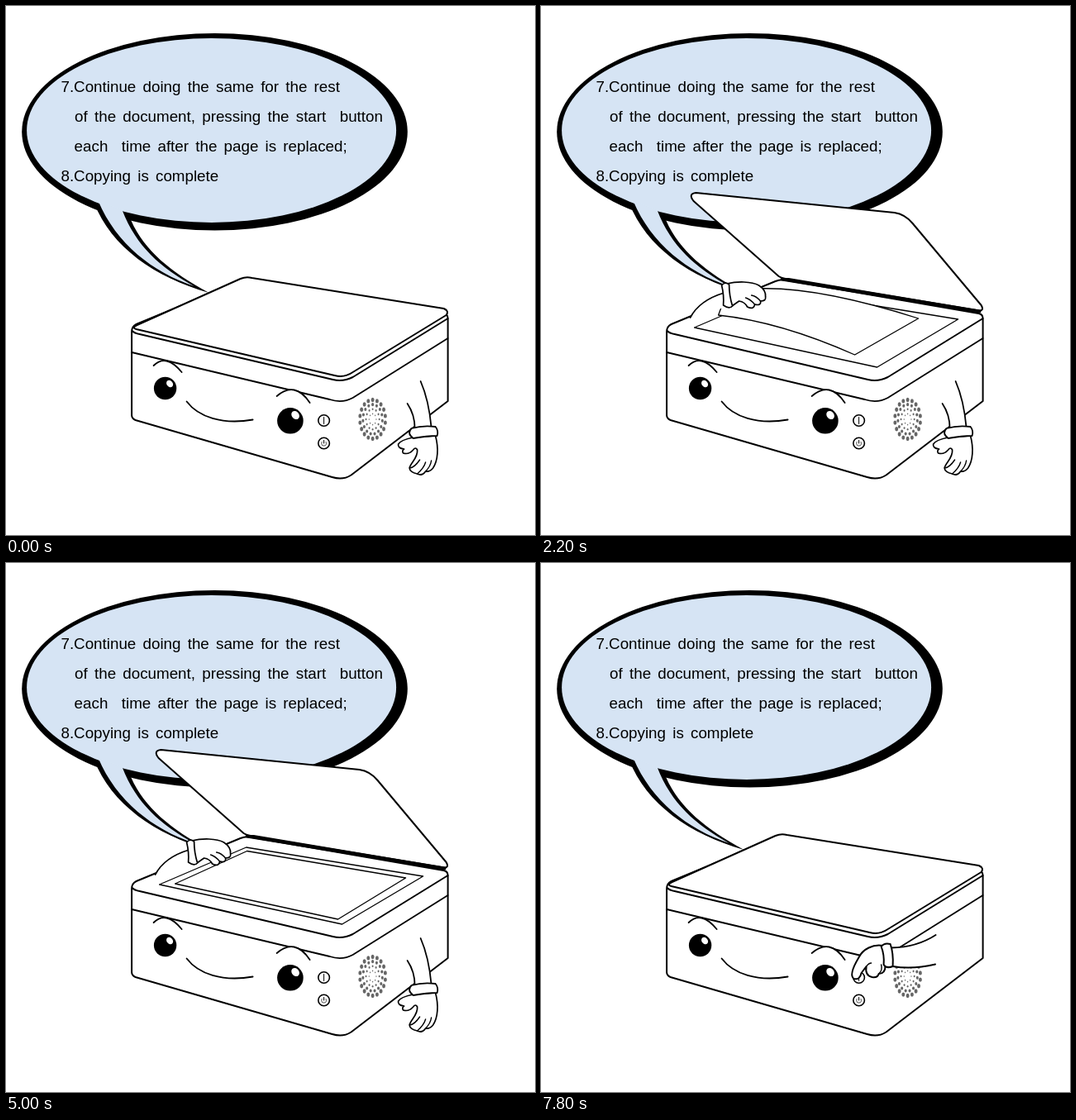
An HTML page with a canvas that plays this animation: 640 by 640 pixels, repeating every 8 s.

```html
<!DOCTYPE html>
<html lang="en">
<head>
<meta charset="utf-8">
<title>Copying a document</title>
<style>
html, body { margin: 0; width: 100%; height: 100%; overflow: hidden; background: #fff; }
canvas { display: block; width: 640px; height: 640px; }
</style>
</head>
<body>
<canvas id="stage" width="640" height="640"></canvas>
<script>
const ctx = document.getElementById('stage').getContext('2d');
const LOOP = 8000;
const CLOSED = 0, AJAR = 1, HALF = 2, OPEN = 3;

// Poses are held until the next start time.
const poses = [
  { at: 0, lid: CLOSED },
  { at: 1000, lid: AJAR, page: true },
  { at: 1400, lid: HALF, page: true, hand: 'wave' },
  { at: 1800, lid: OPEN, page: true, hand: 'wave' },
  { at: 2200, lid: OPEN, hand: 'pull' },
  { at: 2600, lid: OPEN, hand: 'hold' },
  { at: 3000, lid: OPEN, hand: 'tuck' },
  { at: 3400, lid: OPEN },
  { at: 3800, lid: OPEN, hand: 'tuck', lit: true },
  { at: 4200, lid: OPEN, hand: 'hold', lit: true },
  { at: 4600, lid: OPEN },
  { at: 5000, lid: OPEN, page: true, hand: 'lay' },
  { at: 5400, lid: OPEN, page: true },
  { at: 5800, lid: OPEN, page: true, hand: 'wave' },
  { at: 6200, lid: HALF, page: true, hand: 'wave', tucked: true },
  { at: 6600, lid: AJAR, page: true },
  { at: 7000, lid: CLOSED },
  { at: 7800, lid: CLOSED, press: true }
];

function fill(d, color = '#fff') {
  ctx.fillStyle = color;
  ctx.fill(new Path2D(d));
}
function line(d, width = 2) {
  ctx.lineWidth = width;
  ctx.strokeStyle = '#000';
  ctx.stroke(new Path2D(d));
}
function shape(d, width, color) {
  fill(d, color);
  line(d, width);
}
function oval(x, y, rx, ry, color, turn = 0) {
  ctx.beginPath();
  ctx.ellipse(x, y, rx, ry, turn, 0, Math.PI * 2);
  ctx.fillStyle = color;
  ctx.fill();
}
function ring(x, y, r, width) {
  ctx.beginPath();
  ctx.arc(x, y, r, 0, Math.PI * 2);
  ctx.lineWidth = width;
  ctx.strokeStyle = '#000';
  ctx.stroke();
}

function bubble() {
  const blue = '#d6e4f4';
  oval(252.9, 152.3, 233.3, 119.3, '#000');
  fill('M107 238C128 292 180 328 246 347C200 322 168 296 152 260L140 246Z', '#000');
  oval(249, 150.5, 223.5, 111.5, blue);
  fill('M112 236C134 288 178 322 228 339C188 317 158 291 141 247Z', blue);
  ctx.fillStyle = '#000';
  ctx.font = '18.8px "Liberation Sans", Arial, sans-serif';
  ctx.wordSpacing = '3px';
  ctx.fillText('7.', 67, 103.5);
  ctx.fillText('Continue doing the same for the rest', 82.5, 103.5);
  ctx.fillText('of the document, pressing the start  button', 83.5, 139.5);
  ctx.fillText('each  time after the page is replaced;', 83, 176);
  ctx.fillText('8.', 67, 212);
  ctx.fillText('Copying is complete', 82.5, 212);
}

function openLid() {
  shape('M288 327L185 236Q178 227 188 226L428 250Q441 252 450 263L533 362Q537 369 530 368.500L300 330Q293 330 288 327Z');
}
function halfLid(tucked) {
  fill('M291 329L167 264L408 296Q422 297 432 303L533 368Z');
  line((tucked ? 'M291 329L206 286M205 269' : 'M291 329L167 264') +
    'L408 296Q422 297 432 303L533 368');
}
function ajarLid() {
  shape('M286 331L159 351Q153 347 162 344L284 330Q291 328 298 330L531 368Q535 370 530 372L422 394Q410 397 396 394L159 351');
}
function closedLid() {
  shape('M159 386L284 330Q291 327 298 329L530 366Q537 369 533 374L420 443Q410 450 398 447L158 391Q152 389 159 386Z');
}

function body() {
  shape('M152.500 395Q152 388 158 385L284 333Q291 330 298 332L530 372Q535 373 535 378V478L418 567.500Q408 574 395 570L157 501Q152.500 499 152.500 495Z');
  line('M153 393Q156 396 162 397L396 452Q408 455 420 449L535 378');
  line('M152.500 419L392 476Q407 481 420 474L535 402', 1.8);
}

function glass(page) {
  line('M291 344L505 379L407 437L186 389Z', 1.3);
  if (page) line('M292 348.500L484 381L402 431L205 388Z', 1.3);
}

function face() {
  line('M179 435Q194 420 213 443', 1.8);
  shape('M328 472Q350 453 368 480', 1.8);
  oval(193, 462.5, 13.7, 13.7, '#000');
  oval(198.5, 457, 3.6, 4.6, '#fff', -0.7);
  oval(344.3, 501.8, 15.8, 15.8, '#000');
  oval(350.5, 495, 4.4, 5.4, '#fff', -0.7);
  line('M219 478.500C233 497 262 507 299 500.500', 1.8);
}

function buttons(lit) {
  for (const y of [501.5, 529]) {
    oval(385, y, 7, 7, lit ? '#62ee98' : '#fff');
    ring(385, y, 6.8, 1.6);
  }
  line('M385 497.500V505.500M385 525.500V529', 1);
  line('M382.500 527.500Q381 532 385 532Q389 532 387.500 527.500', 0.7);
}

function speaker() {
  const rings = [[1, 18, 2.2], [0.76, 15, 1.7], [0.52, 12, 1.1], [0.28, 8, 0.7]];
  for (const [scale, count, r] of rings) {
    for (let i = 0; i < count; i++) {
      const a = i / count * Math.PI * 2;
      oval(444 + 15.5 * scale * Math.sin(a), 500 - 23.5 * scale * Math.cos(a),
        r * 0.9, r * 1.2, '#666');
    }
  }
}

function restingArm() {
  fill('M502 454C509 470 513 488 515 511L495 513C495 498 492 490 486 481Z');
  line('M502 454C509 470 513 488 515 510M486 481C492 490 495 498 495 511', 1.8);
  shape('M520 520C524 535 523 550 517 559Q513 564 508 563Q504 569 498 566Q489 564 488.500 559C490 552 499 547 498 537Q496 533 493 537Q488 543 481 541Q479 538 482 536Q474 535 475 530Q478 525 493 522Z', 1.7);
  line('M489 559Q495 558 501 549M498 566Q506 559 508 552M508 563Q514 557 515 550', 1.4);
  shape('M491 511Q505 507 520 509Q524 514 522 520Q510 520 493 523Q485 517 491 511Z', 1.8);
}

function pressingArm() {
  fill('M424 466Q455 465 478 450V486Q450 493 426 488Z');
  line('M424 465.500Q455 465 478 450M426 488Q450 492 477.500 485.500', 1.8);
  shape('M414 463C402 461 390 467 385 477C379 487 373 499 379 503Q386 505 388 496L394 488Q392 499 401 501Q408 502 409 497Q417 497 417 487Z');
  line('M394 488Q397 484 400 484M409 497Q414 493 412 486', 1.4);
  shape('M412 464Q416 459 423 461Q427 472 426 488Q418 491 415 486Q416 474 412 464Z');
}

function wavingHand() {
  shape('M178 373C168 361 165 346 169 335Q172 326 178 328Q183 323 188 328Q190 333 186 341L189 349Q192 351 194 346Q197 336 202 339L203 344Q209 339 209.500 345Q207 353 203 357Q201 361 204 366L206 370L181 380Z', 1.7);
  line('M178 328Q173 336 174 343M186 341Q181 345 182 350M203 344Q200 347 199 350', 1.4);
  shape('M177 373Q190 372 203 364L207 370Q190 374 180 380Z', 1.6);
}

function holdingHand() {
  shape('M178 378C169 365 166 351 169 341Q172 333 178 334Q185 329 189 334Q190 341 185 349L191 358Q199 358 206 364L208 371L181 382Z', 1.7);
  line('M191 358Q194 364 192 371', 1.4);
}

function heldSheet() {
  shape('M148 236C175 260 182 298 178 333L190 357L232 375C265 325 250 268 214 227Z', 1.4);
}

// Fingers that close over the front of the held sheet.
function holdingFingers() {
  fill('M170 341Q173 333 178 334Q185 329 189 334Q190 341 185 349L190 357L176 360Z');
  line('M169 343Q172 333 178 334Q185 329 189 334Q190 341 185 349L190 357M178 334Q173 342 175 349M189 334Q180 341 182 350', 1.6);
}

function tuckedSheet() {
  shape('M152 465L121 484L95 462C87 450 97 432 121 423Q138 421 153 422Z', 1.3);
  line('M152 428C132 434 133 451 152 456', 1.3);
  shape('M157 388C144 389 131 396 126 407C119 414 118 424 122 429Q126 431 128 425L132 417Q128 427 130 431Q134 433 137 425L143 416Q148 422 157 420Z', 1.7);
  shape('M149 391Q148 406 150 418L157 418V390Z', 1.6);
}

function layingHand() {
  fill('M181 377Q192 356 222 347L226 364L198 371Z');
  line('M181 377Q192 356 222 347', 1.7);
  shape('M225 336C238 333 255 333 264 338Q273 344 272 352Q273 357 266 357Q267 363 259 361Q258 368 250 364Q247 358 240 357L230 364Z', 1.7);
  line('M266 357Q261 351 255 350M259 361Q254 355 248 353', 1.4);
  shape('M219 338Q223 333 228 337Q228 350 232 363Q228 367 221 362Q222 350 219 338Z', 1.7);
}

function pulledSheet() {
  shape('M225 347Q300 328 457 378L380 422Q290 382 215 374Z', 1.3);
}

function draw(p) {
  ctx.setTransform(1, 0, 0, 1, 0, 0);
  ctx.fillStyle = '#fff';
  ctx.fillRect(0, 0, 640, 640);
  ctx.translate(-0.4, 0);
  ctx.lineJoin = ctx.lineCap = 'round';

  if (p.lid === HALF) halfLid(p.tucked);
  bubble();
  if (p.lid === OPEN) openLid();
  if (p.hand === 'wave') wavingHand();
  if (p.hand === 'tuck') tuckedSheet();
  if (p.hand === 'hold') holdingHand();

  body();
  if (p.lid === CLOSED) closedLid();
  else glass(p.page);
  if (p.lid === AJAR) ajarLid();
  if (p.lid >= HALF) line('M292 330.500L531 369.500', p.lid === OPEN ? 3.8 : 3);

  face();
  buttons(p.lit);
  speaker();
  if (p.press) pressingArm();
  else restingArm();

  if (p.hand === 'hold') {
    heldSheet();
    holdingFingers();
  }
  if (p.hand === 'pull') pulledSheet();
  if (p.hand === 'pull' || p.hand === 'lay') layingHand();
}

const start = performance.now();
function tick() {
  const t = (performance.now() - start) % LOOP;
  draw(poses.findLast(p => p.at <= t));
  requestAnimationFrame(tick);
}
tick();
</script>
</body>
</html>
```
